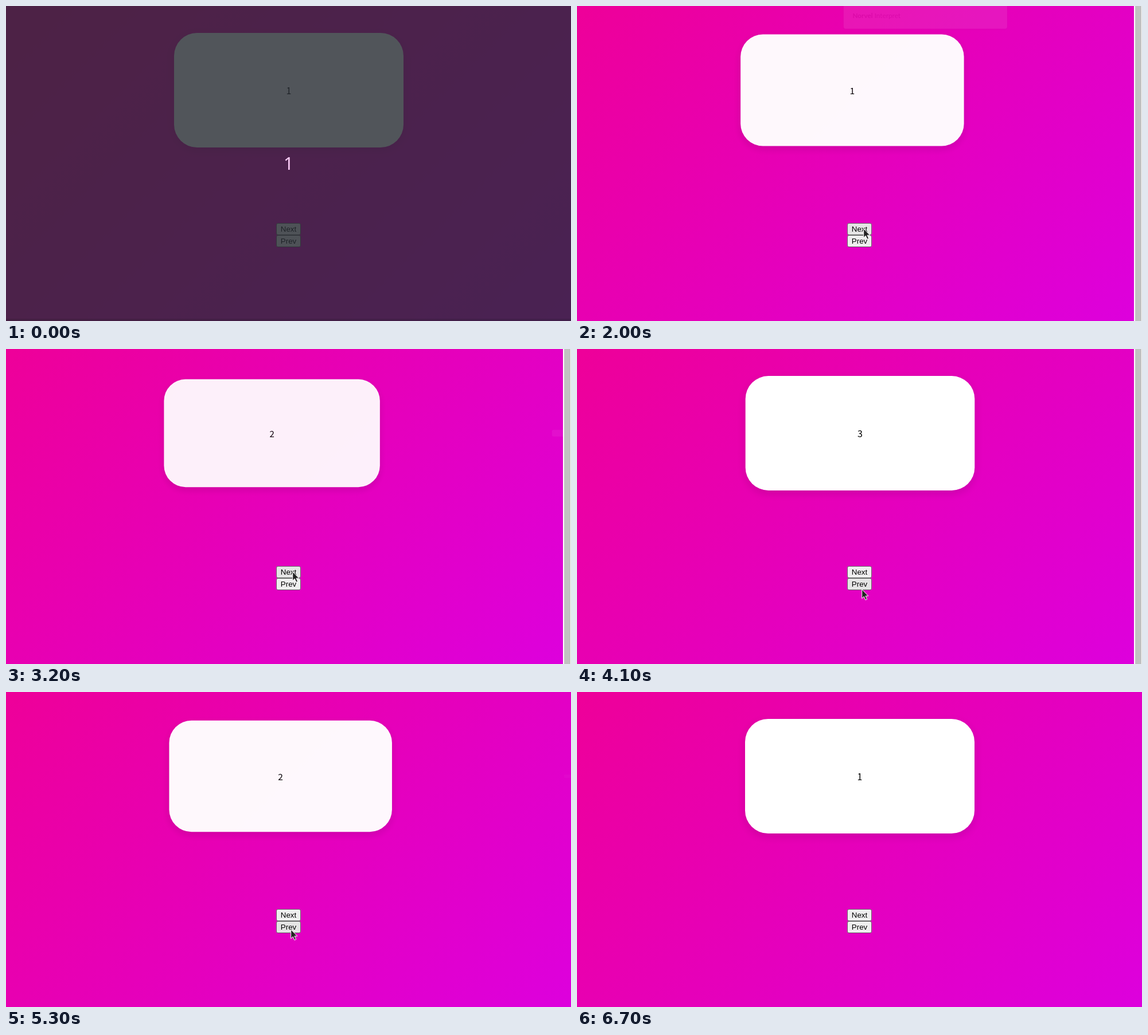
An HTML page for the animation above (6.9 s loop, 985 px wide and 550 px high).

```html
<!DOCTYPE html>
<html lang="en">
<head>
<meta charset="utf-8">
<title>Card slider</title>
<style>
html, body { margin: 0; width: 100%; height: 100%; overflow: hidden; }
body { position: relative; background: linear-gradient(135deg, #e09, #d0d); }
body > * { position: absolute; box-sizing: border-box; }
.card {
  left: 293px; top: 47px; width: 400px; height: 200px; border-radius: 40px;
  background: #fff; color: #000; box-shadow: 0 5px 15px rgba(0, 0, 0, .12);
  font: 300 16px/200px "Noto Sans CJK JP", "Noto Sans CJK SC", "Noto Sans CJK", sans-serif;
  text-align: center;
}
.button {
  left: 471px; width: 43px; height: 21px; border: 1px solid #666; border-radius: 3px;
  background: #efefef; color: #000; text-align: center;
  font: 13.333px/19px "Liberation Sans", Arial, sans-serif;
}
.button.hover { background: #e5e5e5; }
#next { top: 379px; }
#prev { top: 400px; }
#popup {
  left: 458px; top: -40px; width: 291px; height: 77px; border-radius: 4px;
  background: #f0f0f0; color: #5f6368; box-shadow: 0 1px 4px rgba(0, 0, 0, .35);
  padding: 45px 0 0 16px; transform-origin: 100% 100%; white-space: nowrap;
  font: 12px/18px Lato, sans-serif;
}
#popup b { font-weight: 700; }
#bar { left: 971px; top: 0; width: 14px; height: 550px; background: #c1c1c1; border: solid #fff; border-width: 0 1px 0 2px; }
#cursor { left: 0; top: 0; }
#shade {
  inset: 0; background: rgba(38, 43, 49, .8); border-bottom: 4px solid rgba(0, 0, 0, .1);
  color: #ffd0fb; font: 30px/550px "Noto Sans", sans-serif; text-align: center;
}
#shade span { position: absolute; left: 0; width: 985px; top: 0; }
</style>
</head>
<body>
<div class="card" id="leaving"></div>
<div class="card" id="entering"></div>
<div class="button" id="next">Next</div>
<div class="button" id="prev">Prev</div>
<div id="popup"><b>Norvel</b> Interpret</div>
<div id="bar"></div>
<svg id="cursor" width="14" height="22"><path d="M.7 .8V16.5L4.3 13.2L6.9 19.2L9.6 18L7 12.2H11.8Z" fill="#222" stroke="#fff"/></svg>
<div id="shade"><span>1</span></div>
<script>
const LOOP = 6900, STEP = 100;
const el = id => document.getElementById(id);
const show = (node, on) => { node.style.visibility = on ? "visible" : "hidden"; };

// visible from, start, duration, leaving label, entering label
const slides = [
  [0, -2000, 1000, "", 1],
  [600, 490, 1000, "", 1],
  [1900, 1885, 1000, 1, 2],
  [3100, 3010, 1115, 2, 3],
  [4500, 4100, 1200, 3, 2],
  [5200, 5156, 1200, 2, 1]
];
const barTimes = [[600, 1800], [1900, 3000], [3100, 4200], [5400, 6600]];
// time, x, y
const path = [
  [600, 503, 381], [1200, 503, 381], [1500, 499, 388], [3700, 499, 388], [3900, 496, 419],
  [5100, 496, 419], [5200, 496, 414], [5900, 496, 414], [6500, 976, 21]
];

function easeInOut(x) {
  if (x <= 0) return 0;
  if (x >= 1) return 1;
  let lo = 0, hi = 1;
  for (let i = 0; i < 24; i++) {
    const s = (lo + hi) / 2, r = 1 - s;
    if (1.26 * s * r * r + 1.74 * s * s * r + s ** 3 < x) lo = s; else hi = s;
  }
  return lo * lo * (3 - 2 * lo);
}

function place(card, label, shift, size) {
  card.textContent = label;
  card.style.opacity = size;
  card.style.transform = size < 1 ? `translateX(${shift}px) scale(${size})` : "none";
  show(card, label !== "" && size > 0);
}

function pointer(t) {
  const i = Math.max(1, path.findIndex(p => p[0] >= t));
  const [t0, x0, y0] = path[i - 1], [t1, x1, y1] = path[i];
  const k = (t - t0) / (t1 - t0);
  return [x0 + (x1 - x0) * k, y0 + (y1 - y0) * k];
}

function draw(t) {
  const [, start, length, from, to] = slides.filter(s => s[0] <= t).pop();
  const p = easeInOut((t - start) / length);
  place(el("leaving"), from, -500 * p, 1 - p);
  place(el("entering"), to, 500 * (1 - p), p);

  const onStage = t >= 600 && t <= 6500;
  show(el("cursor"), onStage);
  if (onStage) {
    const [x, y] = pointer(t);
    el("cursor").style.transform = `translate(${x}px, ${y}px)`;
  }
  el("next").classList.toggle("hover", t >= 600 && t < 3800);
  el("prev").classList.toggle("hover", t >= 3800 && t < 6000);

  const fade = Math.min(1, Math.max(0, (t - 1800) / 220));
  const popup = el("popup");
  show(popup, t >= 700 && fade < 1);
  popup.style.opacity = 1 - fade;
  popup.style.transform = `translate(${fade}px, ${3 * fade}px) scale(${1 - .022 * fade})`;

  show(el("bar"), barTimes.some(([a, b]) => t >= a && t < b));
  show(el("shade"), t < 100);
}

function frame() {
  const t = performance.now() % LOOP;
  draw(Math.floor(t / STEP) * STEP);
  requestAnimationFrame(frame);
}
frame();
</script>
</body>
</html>
```
